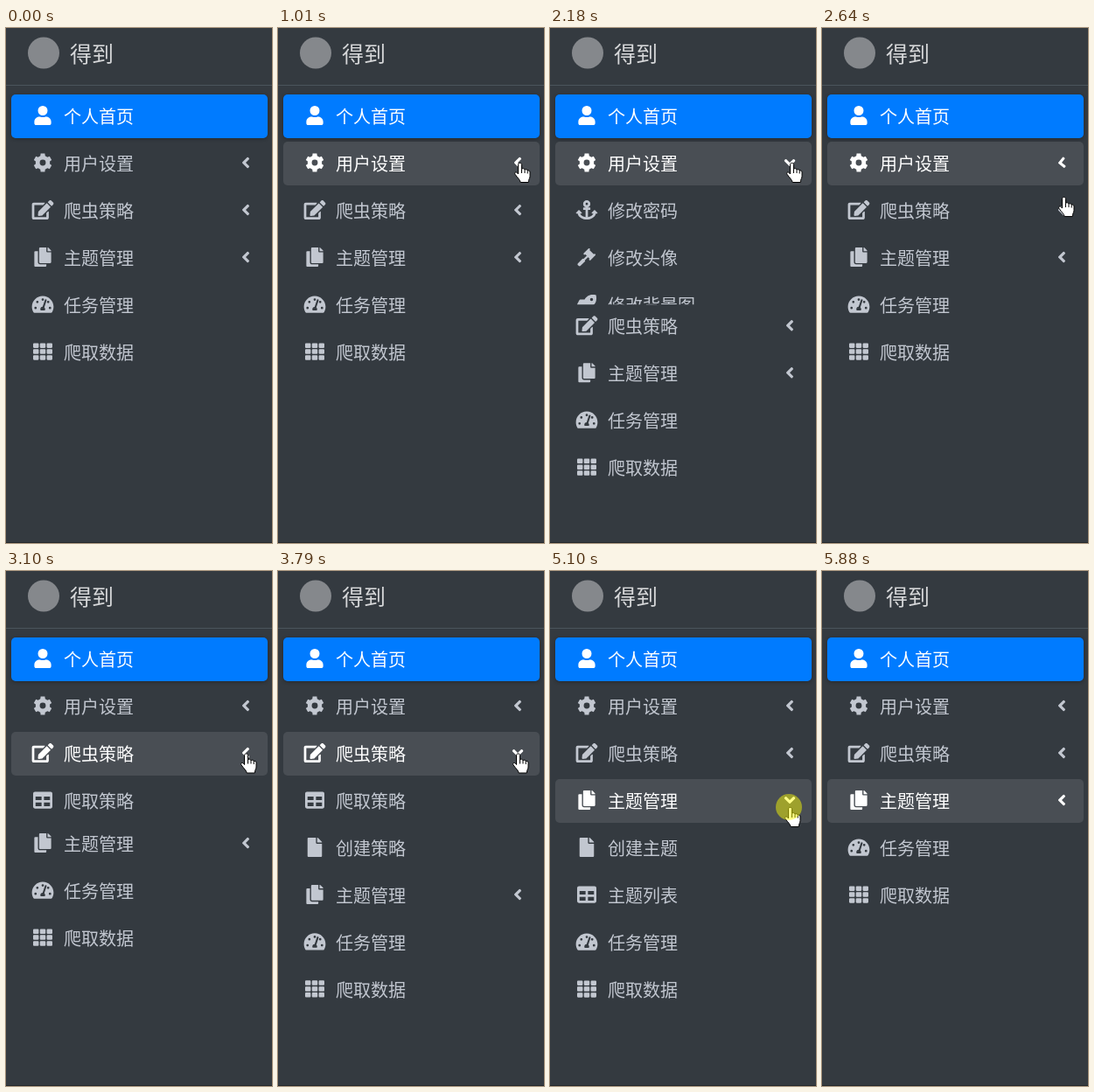
Write an HTML page with a canvas that moves like this. It is 304 by 589 pixels and loops after 6030 ms.

```html
<!DOCTYPE html>
<html lang="zh-CN">
<head>
<meta charset="utf-8">
<title>Sidebar menu</title>
<style>
html, body { margin: 0; width: 100%; height: 100%; overflow: hidden; background: #343a40; }
canvas { display: block; width: 304px; height: 589px; }
</style>
</head>
<body>
<canvas id="stage"></canvas>
<script>
const W = 304, H = 589, LOOP = 6030, TICK = LOOP / 78;
const PITCH = 54, ROW_H = 50, TOP = 76, SLIDE = 300;
const FONT = '"Noto Sans CJK SC", "Noto Sans CJK", "Noto Sans", sans-serif';
const GREY = '#c2c7d0', WHITE = '#fff';

const canvas = document.getElementById('stage');
const ctx = canvas.getContext('2d');
const dpr = window.devicePixelRatio || 1;
canvas.width = W * dpr;
canvas.height = H * dpr;

// Icons live on a 512-unit high grid: [width, path]
function gear() {
  const p = new Path2D();
  for (let i = 0; i < 6; i++) {
    for (const [r, d] of [[192, -19.5], [248, -13], [248, 13], [192, 19.5]]) {
      const a = (60 * i - 90 + d) * Math.PI / 180;
      p.lineTo(256 + r * Math.cos(a), 256 + r * Math.sin(a));
    }
  }
  p.closePath();
  return hole(p, 256, 256, 80);
}

function hole(p, x, y, r) {
  p.moveTo(x + r, y);
  p.arc(x, y, r, 0, 7);
  return p;
}

function gauge() {
  const p = new Path2D('M288 32C129 32 0 161 0 320c0 53 14 102 39 145 6 10 16 15 27 15h443c11 0 22-5 28-15 25-43 39-92 39-145C576 161 447 32 288 32z' +
    'M391 152l-61 184c13 11 22 29 22 48 0 12-3 23-9 32H233c-6-9-9-20-9-32 0-34 27-61 60-63l61-184c4-13 18-20 30-16 13 4 20 18 16 31z');
  for (const [x, y] of [[288, 128], [96, 352], [144, 192], [432, 192], [480, 352]]) hole(p, x, y, 32);
  return p;
}

function grid() {
  const p = new Path2D();
  for (let i = 0; i < 9; i++) p.roundRect(i % 3 * 181.3, 32 + 160 * Math.floor(i / 3), 149.3, 128, 24);
  return p;
}

function table() {
  const p = new Path2D();
  p.roundRect(0, 32, 512, 448, 48);
  for (const x of [64, 288]) for (const y of [160, 320]) p.rect(x, y, 160, 96);
  return p;
}

// Head, two caps, handle and grip laid out upright, then turned by 45 degrees
function gavel() {
  const flat = new Path2D(), p = new Path2D();
  flat.roundRect(-128, -238, 48, 224, 26);
  flat.roundRect(80, -238, 48, 224, 26);
  flat.rect(-80, -206, 160, 160);
  flat.rect(-28, -46, 56, 116);
  flat.roundRect(-48, 70, 96, 226, 32);
  p.addPath(flat, new DOMMatrix().translate(241, 271).rotate(45));
  return p;
}

const anchor = 'M13 352h32c22 103 137 160 243 160s221-57 243-160h32c11 0 16-13 8-20l-67-68q-8-7-16 0l-68 68c-7 7-2 20 9 20h35c-20 54-85 87-144 94V256h52q12 0 12-12v-40q0-12-12-12h-52v-5c37-14 64-49 64-91a96 96 0 0 0-192 0c0 42 27 78 64 91v5h-52q-12 0-12 12v40q0 12 12 12h52v190c-59-7-124-40-144-94h35c11 0 16-13 9-20l-68-68q-8-7-16 0l-68 68c-7 7-2 20 9 20z';

const icons = {
  user: [448, new Path2D('M224 256a128 128 0 1 0 0-256 128 128 0 0 0 0 256zM314 288h-17q-73 32-146 0h-17C60 288 0 348 0 422v42c0 26 22 48 48 48h352c26 0 48-22 48-48v-42c0-74-60-134-134-134z')],
  gear: [512, gear()],
  edit: [576, new Path2D('M403 83l90 90q6 7 0 14L274 406l-92 10c-13 1-23-9-22-22l10-92L389 83q7-6 14 0zM565 60l-49-49c-15-15-40-15-55 0l-36 36q-6 7 0 14l90 90q7 6 14 0l36-36c15-15 15-40 0-55zM384 346v102H64V128h230q5 0 8-4l40-40c8-7 3-20-8-20H48C22 64 0 86 0 112v352c0 26 22 48 48 48h352c26 0 48-22 48-48V306c0-11-13-16-20-8l-40 40q-4 3-4 8z')],
  copy: [448, new Path2D('M320 448v40q0 24-24 24H24q-24 0-24-24V120q0-24 24-24h72v296c0 31 25 56 56 56zM320 104V0H152q-24 0-24 24v368q0 24 24 24h272q24 0 24-24V128H344q-24 0-24-24zM441 73L375 7q-7-7-17-7h-6v96h96v-6q0-10-7-17z')],
  gauge: [576, gauge()],
  grid: [512, grid()],
  anchor: [576, hole(new Path2D(anchor), 288, 96, 32)],
  gavel: [512, gavel()],
  rocket: [512, hole(new Path2D('M505 19c-1-5-7-11-12-12C461 0 435 0 410 0 307 0 245 55 199 128H95c-18 0-35 10-43 27L3 253c-8 16 4 35 21 35h104l-22 23c-14 14-14 32 0 45l50 50c14 14 32 14 45 0l23-22v104c0 18 19 29 35 22l98-50c17-8 27-25 27-43V313c73-46 128-108 128-211 0-25 0-51-7-83z'), 384, 128, 40)],
  file: [384, new Path2D('M224 136V0H24Q0 0 0 24v464q0 24 24 24h336q24 0 24-24V160H248q-24 0-24-24zM384 122v6H256V0h6q10 0 17 7l98 98q7 7 7 17z')],
  table: [512, table()],
  angle: [256, new Path2D('M32 239l136-136q17-14 34 0l22 23q14 17 0 34l-96 96 96 96q14 17 0 34l-22 23q-17 14-34 0L32 273q-14-17 0-34z')]
};

const menu = [
  { icon: 'gear', text: '用户设置', hover: [530, 2775],
    subs: [['anchor', '修改密码'], ['gavel', '修改头像'], ['rocket', '修改背景图']] },
  { icon: 'edit', text: '爬虫策略', hover: [2700, 4400],
    subs: [['table', '爬取策略'], ['file', '创建策略']] },
  { icon: 'copy', text: '主题管理', hover: [4160, LOOP],
    subs: [['file', '创建主题'], ['table', '主题列表']] },
  { icon: 'gauge', text: '任务管理' },
  { icon: 'grid', text: '爬取数据' }
];

// Presses: menu row, down, up, opens
const clicks = [
  [0, 840, 1000, true], [0, 1930, 2080, false],
  [1, 2780, 2951, true], [1, 3630, 3785, false],
  [2, 4325, 4480, true], [2, 5095, 5265, false]
];

// Pointer: time, x, y
const trail = [
  [455, 291, 191], [690, 275, 154], [2480, 275, 154], [2628, 275, 193], [2705, 273, 208.5],
  [4085, 273, 208.5], [4250, 273, 270], [5300, 273, 270], [5560, 310, 270]
];
const hand = new Path2D('M-.5 13V2.2C-.5-.2 3.5-.2 3.5 2.2V7.6C4.2 6.2 6.8 6.4 7 8.4 7.8 7.2 10 7.4 10.2 9.3 11.2 8.4 13 9 13 11V15.5C13 18 11.3 19 11.3 22.5H2.2C2 20-1.2 17.5-3.8 13.6-5.6 11-2.6 9.6-.5 13z');
const fingers = new Path2D('M3.5 7.5V12M7 8.5V12M10.2 9.5V12.5');

const clamp = v => Math.max(0, Math.min(1, v));
const swing = v => 0.5 - Math.cos(Math.PI * clamp(v)) / 2;
const within = (t, [a, b]) => t >= a && t < b;

// How far a row is open, 0 to 1
function openness(row, t) {
  let v = 0;
  for (const [r, , up, opens] of clicks) {
    if (r === row && t >= up) v = opens ? swing((t - up) / SLIDE) : 1 - swing((t - up) / SLIDE);
  }
  return v;
}

function pointer(t) {
  for (let i = 1; i < trail.length; i++) {
    const [t0, x0, y0] = trail[i - 1], [t1, x1, y1] = trail[i];
    if (within(t, [t0, t1])) {
      const k = (t - t0) / (t1 - t0);
      return [x0 + (x1 - x0) * k, y0 + (y1 - y0) * k];
    }
  }
  return null;
}

function box(y, color) {
  ctx.fillStyle = color;
  ctx.beginPath();
  ctx.roundRect(6, y, 293, ROW_H, 5);
  ctx.fill();
}

function drawIcon(name, x, y, size, turn = 0) {
  const [w, path] = icons[name];
  ctx.save();
  ctx.translate(x, y);
  ctx.rotate(turn);
  ctx.scale(size / 512, size / 512);
  ctx.translate(-w / 2, -256);
  ctx.fill(path, 'evenodd');
  ctx.restore();
}

function drawItem(icon, text, y, color) {
  ctx.fillStyle = color;
  drawIcon(icon, 42, y + 24, 22);
  ctx.font = '20px ' + FONT;
  ctx.fillText(text, 66, y + 33);
}

function drawHeader() {
  ctx.fillStyle = '#85888c';
  ctx.beginPath();
  ctx.arc(43, 28.5, 18, 0, 7);
  ctx.fill();
  ctx.fillStyle = 'rgba(255,255,255,.8)';
  ctx.font = '300 25px ' + FONT;
  ctx.fillText('得到', 73, 39);
  ctx.fillStyle = '#4b545c';
  ctx.fillRect(0, 65, W, 1);
  ctx.fillStyle = '#24282c';
  ctx.fillRect(0, H - 1, W, 1);
}

function drawMenu(t) {
  ctx.save();
  ctx.shadowColor = 'rgba(0,0,0,.3)';
  ctx.shadowBlur = 4 * dpr;
  ctx.shadowOffsetY = dpr;
  box(TOP, '#007bff');
  ctx.restore();
  drawItem('user', '个人首页', TOP, WHITE);

  let y = TOP + PITCH;
  menu.forEach(({ icon, text, hover, subs }, row) => {
    const lit = hover && within(t, hover);
    if (lit) box(y, 'rgba(255,255,255,.1)');
    drawItem(icon, text, y, lit ? WHITE : GREY);
    if (subs) drawIcon('angle', 274, y + 24, 20, -Math.PI / 2 * openness(row, t - SLIDE));
    y += PITCH;
    const h = subs ? subs.length * PITCH * openness(row, t) : 0;
    if (h > 0) {
      ctx.save();
      ctx.beginPath();
      ctx.rect(0, y, W, h);
      ctx.clip();
      subs.forEach(([name, label], i) => drawItem(name, label, y + i * PITCH, GREY));
      ctx.restore();
      y += h;
    }
  });
}

function drawPointer(t) {
  const at = pointer(t);
  if (!at) return;
  ctx.save();
  ctx.translate(...at);
  ctx.fillStyle = WHITE;
  ctx.strokeStyle = '#000';
  ctx.lineWidth = 1;
  ctx.lineJoin = 'round';
  ctx.fill(hand);
  ctx.stroke(hand);
  ctx.stroke(fingers);
  if (clicks.some(([, down, up]) => within(t, [down, up]))) {
    ctx.fillStyle = 'rgba(255,255,0,.47)';
    ctx.beginPath();
    ctx.arc(0, 0, 15, 0, 7);
    ctx.fill();
  }
  ctx.restore();
}

function draw(ms) {
  // The picture advances in even ticks, 78 to a loop
  const t = Math.floor((ms % LOOP) / TICK + 0.14) % 78 * TICK;
  ctx.setTransform(dpr, 0, 0, dpr, 0, 0);
  ctx.fillStyle = '#343a40';
  ctx.fillRect(0, 0, W, H);
  drawHeader();
  drawMenu(t);
  drawPointer(t);
}

const start = performance.now();
function frame() {
  draw(performance.now() - start);
  requestAnimationFrame(frame);
}
frame();
</script>
</body>
</html>
```
